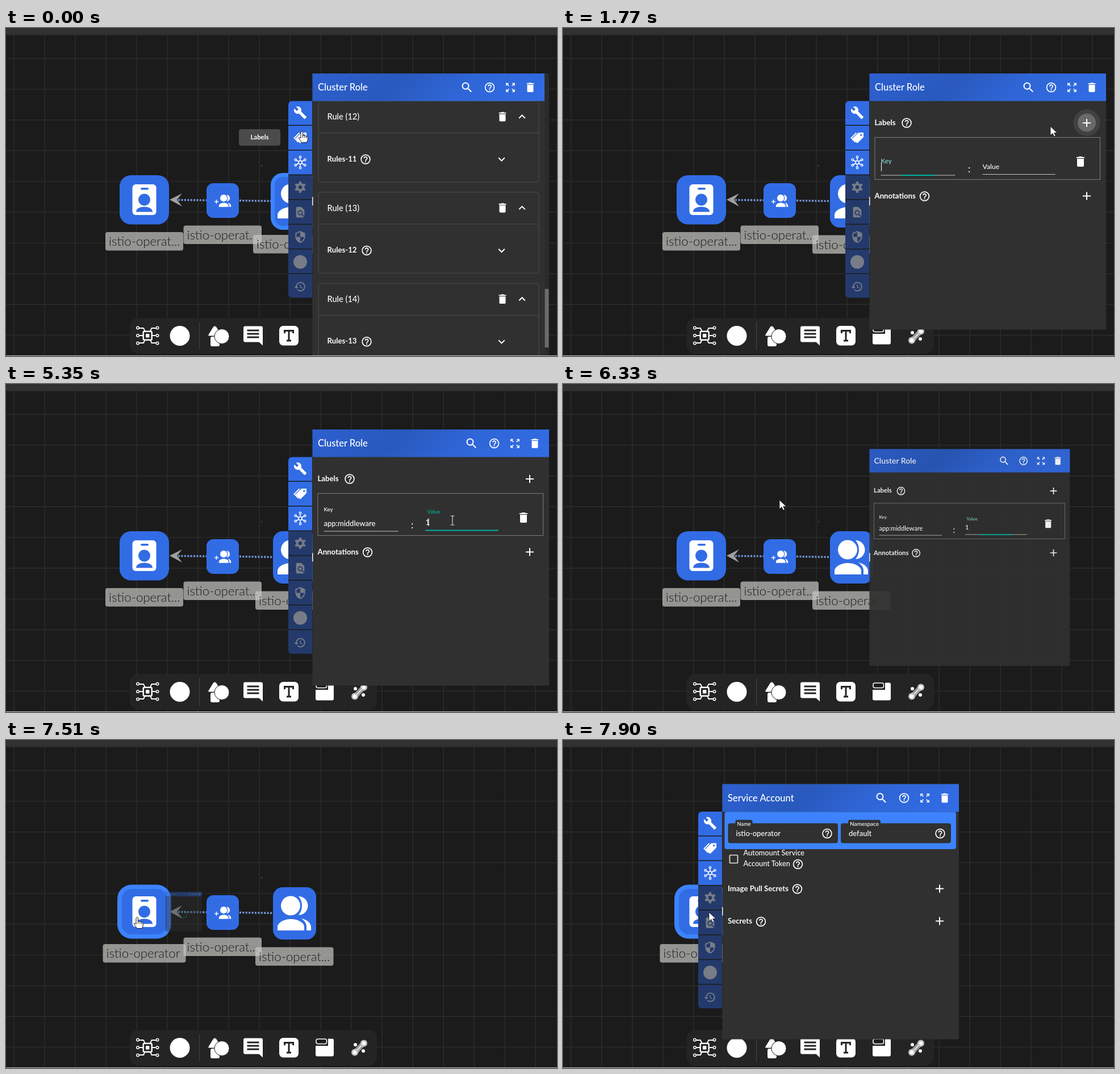
An HTML page that plays this animation: 970x577 px, repeating every 8 s.

```html
<!DOCTYPE html>
<html lang="en">
<head>
<meta charset="utf-8">
<title>Editing labels of a cluster role</title>
<style>
html, body { margin: 0; width: 100%; height: 100%; overflow: hidden; background: #1b1b1b; }
svg { display: block; width: 970px; height: 577px; font-family: Lato, "Open Sans", sans-serif; font-weight: 500; }
text { white-space: pre; }
</style>
</head>
<body>
<svg viewBox="0 0 970 577">
  <defs>
    <linearGradient id="head" gradientUnits="userSpaceOnUse" x1="0" y1="0" x2="230" y2="230">
      <stop offset="0" stop-color="#2d60d0"/>
      <stop offset=".36" stop-color="#2959bd"/>
      <stop offset=".62" stop-color="#2f65d6"/>
      <stop offset="1" stop-color="#326ce5"/>
    </linearGradient>
  </defs>
  <g id="scene"></g>
  <g id="live"></g>
  <rect y="576" width="970" height="1" fill="#cfc4c8"/>
</svg>
<script>
const BLUE = '#326ce5', BRIGHT = '#3d83ff', PANEL = '#303030', TEAL = '#00b39f';
const LOOP = 8000;

const ICONS = {
  search: 'M15.5 14h-.79l-.28-.27A6.47 6.47 0 0 0 16 9.5 6.5 6.5 0 1 0 9.5 16c1.61 0 3.09-.59 4.23-1.57l.27.28v.79l5 4.99L20.49 19zm-6 0a4.5 4.5 0 1 1 0-9 4.5 4.5 0 0 1 0 9z',
  help: 'M11 18h2v-2h-2zm1-16a10 10 0 1 0 0 20 10 10 0 0 0 0-20zm0 18a8 8 0 1 1 0-16 8 8 0 0 1 0 16zm0-14c-2.21 0-4 1.79-4 4h2c0-1.1.9-2 2-2s2 .9 2 2c0 2-3 1.75-3 5h2c0-2.25 3-2.5 3-5 0-2.21-1.79-4-4-4z',
  expand: 'M15 3l2.3 2.3-2.89 2.87 1.42 1.42L18.7 6.7 21 9V3zM3 9l2.3-2.3 2.87 2.89 1.42-1.42L6.7 5.3 9 3H3zm6 12l-2.3-2.3 2.89-2.87-1.42-1.42L5.3 17.3 3 15v6zm12-6l-2.3 2.3-2.87-2.89-1.42 1.42 2.89 2.87L15 21h6z',
  trash: 'M6 19c0 1.1.9 2 2 2h8c1.1 0 2-.9 2-2V7H6zM19 4h-3.5l-1-1h-5l-1 1H5v2h14z',
  down: 'M16.59 8.59 12 13.17 7.41 8.59 6 10l6 6 6-6z',
  up: 'M12 8l-6 6 1.41 1.41L12 10.83l4.59 4.58L18 14z',
  add: 'M19 13h-6v6h-2v-6H5v-2h6V5h2v6h6z',
  wrench: 'M22.7 19l-9.1-9.1c.9-2.3.4-5-1.5-6.9-2-2-5-2.4-7.4-1.3L9 6 6 9 1.6 4.7C.4 7.1.9 10.1 2.9 12.1c1.9 1.9 4.6 2.4 6.9 1.5l9.1 9.1c.4.4 1 .4 1.4 0l2.3-2.3c.5-.4.5-1.1.1-1.4z',
  page: 'M20 19.59V8l-6-6H6c-1.1 0-2 .9-2 2v16c0 1.1.9 2 2 2h12c.45 0 .85-.15 1.19-.4l-4.43-4.43A5 5 0 1 1 16.17 15.75zM9 13a3 3 0 1 0 6 0 3 3 0 0 0-6 0z',
  shield: 'M12 1 3 5v6c0 5.55 3.84 10.74 9 12 5.16-1.26 9-6.45 9-12V5zm0 11h7c-.53 4.12-3.28 7.79-7 8.94V12H5V6.3l7-3.11z',
  history: 'M13 3a9 9 0 0 0-9 9H1l3.96 4L9 12H6a7 7 0 1 1 2.06 4.94l-1.42 1.42A9 9 0 1 0 13 3zm-1 5v5l4.28 2.54.72-1.21-3.5-2.08V8z'
};

// ---- drawing helpers
const box = (x, y, w, h, r, fill, more = '') =>
  `<rect x="${x}" y="${y}" width="${w}" height="${h}" rx="${r}" fill="${fill}" ${more}/>`;
const path = (d, fill = '#fff', more = '') => `<path d="${d}" fill="${fill}" ${more}/>`;
const line = (d, color = '#fff', w = 1, more = '') => path(d, 'none', `stroke="${color}" stroke-width="${w}" ${more}`);
const dot = (x, y, r, fill = '#fff', more = '') => `<circle cx="${x}" cy="${y}" r="${r}" fill="${fill}" ${more}/>`;
const text = (x, y, size, str, more = 'fill="#fff"') =>
  `<text x="${x}" y="${y + size * .35}" font-size="${size}" ${more}>${str}</text>`;
const bold = (x, y, str) => text(x, y, 13.2, str, 'fill="#fff" font-weight="700"');
const group = (transform, body, more = '') => `<g transform="${transform}" ${more}>${body}</g>`;
const icon = (name, x, y, size = 24, fill = '#fff') =>
  group(`translate(${x} ${y}) scale(${size / 24}) translate(-12 -12)`, path(ICONS[name], fill, 'fill-rule="evenodd"'));
const help = (x, y) => icon('help', x, y, 21);
const around = (n, f) => Array.from({length: n}, (_, i) => f(i * 360 / n)).join('');

// ---- canvas, nodes and dock
function grid() {
  let d = '';
  for (let x = 14; x < 970; x += 54) d += `M${x} 12V577`;
  for (let y = 53.5; y < 577; y += 54.1) d += `M0 ${y}H970`;
  return line(d, '#2d2d2d', 1.4);
}

function dock() {
  const pins = line('M235 541h6M234 528h8l3 6M234 554h8l3-6', '#fff', 1.8) +
    [527.5, 541, 554.5].map(y => dot(232, y, 2.2, 'none', 'stroke="#fff" stroke-width="1.6"')).join('');
  return box(218, 510, 435, 63, 15, '#242424') + box(340, 517, 1.2, 49, 0, '#3c4049') +
    pins + group('translate(498.5 0) scale(-1 1)', pins) +
    box(241.7, 533.7, 15, 15, 2, 'none', 'stroke="#fff" stroke-width="2.4"') + box(246, 538, 6.4, 6.4, 1, '#fff') +
    dot(306, 541.5, 17.5) +
    path('M367.500 524.500q2 0 3 2l8 13q1 2-1 2h-20q-2 0-1-2l8-13q1-2 3-2z') + box(360, 543, 16, 17, 3, '#fff') +
    dot(380, 542.5, 13, '#fff', 'stroke="#242424" stroke-width="1"') +
    path('M421 524.5h28q3 0 3 3v31l-6.500-6H421q-3 0-3-3v-22q0-3 3-3z') +
    line('M424.500 532h21M424.500 538h21M424.500 544h21', '#242424', 2.8) +
    box(481, 524, 34, 34.500, 7, '#fff') +
    line('M490.500 537v-4.500h15v4.500M498 532.500v17.500M494 550h8', '#242424', 3) +
    path('M545 538h22v-12.500h7q3 0 3 3v25q0 3-3 3h-26q-3 0-3-3z') +
    box(546, 526, 18.500, 8.500, 3, '#1c1c1c', 'stroke="#fff" stroke-width="1.5"') +
    line('M614 550 630 533', '#9b9b9b', 9, 'stroke-linecap="round"') +
    line('M614 550 630 533', '#fff', 1.5) +
    dot(614, 549.500, 6, '#c4c4c4') + dot(630, 533.500, 6, '#c4c4c4') +
    dot(614, 549.500, 3.2) + dot(630, 533.500, 3.2) + dot(615, 536, 3) + dot(629, 547, 3);
}

const people = dot(501, 291.5, 17) +
  path('M478 335v-6c0-8 12-14 23.500-14s23.500 6 23.500 14v6z') +
  path('M515 275a16.500 16.500 0 0 1 0 33c8-9 8-24 0-33z') +
  path('M520 314c10 2 17 8 17 15v6h-8v-7c0-6-4-10-9-14z');

const label = (x, y, w, str) => box(x, y, w, 32.5, 4, '#c8c8c4', 'opacity=".7"') +
  text(x + 6, y + 16.5, 22.2, str, 'fill="#1b1b1b" font-weight="300"');

function nodes(account, role) {
  const name = on => on ? 'istio-operator' : 'istio-operat...';
  return line('M303 302.500 353 303M411 303.500 470 304.500', '#7197dc', 3.4, 'stroke-dasharray="3 2.400"') +
    path('M288 302 310 291 301 302 310 314z', '#a0a0a0') +
    (account ? box(196, 254.5, 94.5, 95, 25, BRIGHT) + box(204, 262, 79, 80, 17, BLUE) : box(200, 259, 87, 86.500, 20, BLUE)) +
    box(222.5, 275, 42, 54, 6, '#fff') + box(237, 281, 14, 3.6, 1.8, BLUE) + dot(243.5, 302, 10.5, BLUE) +
    path('M229 323.500c0-6 7-9 14.500-9s14.500 3 14.500 9z', BLUE) +
    box(353, 273, 57, 61, 12, BLUE) + line('M367 305.500h7M370.500 302v7', '#fff', 1.5) +
    group('translate(385.5 304) scale(.36) translate(-507.5 -305)', people) +
    (role ? box(466, 255, 84, 100, 21, BRIGHT) + box(473, 262, 70, 86, 14, BLUE) : box(470, 259, 76, 92, 17, BLUE)) +
    people +
    (account ? label(170.5, 359, 146, name(true)) : label(175, 359, 137, name())) +
    label(312.5, 347.5, 137.500, name()) +
    (role ? label(435, 364, 146, name(true)) : label(439, 364.5, 137.500, name()));
}

// ---- side tabs beside an open panel
function tabs(x, y) {
  const grey = '#777c86';
  const tag = path('M23 3h-9L4.500 12.500a1.500 1.500 0 0 0 0 2L11 21a1.500 1.500 0 0 0 2 0L23 11z') +
    dot(18.8, 7.2, 1.6, BLUE) + line('M10.500 3.500 1.500 12.500 8.500 20', '#fff', 1.8);
  const hub = dot(12, 12, 3, 'none', 'stroke="#fff" stroke-width="1.6"') + around(6, a => group(`rotate(${a} 12 12)`,
    line('M12 9V4', '#fff', 1.5) + dot(12, 2.5, 1.7, 'none', 'stroke="#fff" stroke-width="1.4"')));
  const gear = dot(12, 12, 5.3, 'none', `stroke="${grey}" stroke-width="4"`) + around(6, a =>
    group(`rotate(${a} 12 12)`, path('M9.600 6.500 10.200 2h3.600l.6 4.500z', grey)));
  const at = (i, body) => group(`translate(9 ${9 + i * 43.5})`, body);
  let out = box(0, 0, 42, 346, 7, '#1b1b1b');
  for (let i = 0; i < 8; i++) {
    const top = i * 43.5, fill = i < 3 ? BLUE : '#243a6c';
    out += i == 0 ? path('M7 0H42V42H0V7q0-7 7-7z', fill)
      : i == 7 ? path(`M0 ${top}H42V346H7q-7 0-7-7z`, fill) : box(0, top, 42, 42, 0, fill);
  }
  out += icon('wrench', 21, 20.5) + at(1, tag) + at(2, hub) + at(3, gear) + icon('page', 21, 195.500, 22, grey) +
    icon('shield', 21, 239, 23, grey) + dot(21, 283, 12, grey) + icon('history', 20.500, 326.500, 22, grey);
  return group(`translate(${x} ${y})`, out);
}

// ---- panels, in their own coordinates
function header(title, w, h) {
  const s = w - 416.5;
  return box(0, 0, w, h, 0, 'url(#head)') +
    text(9.500, h / 2, 16.5, title) + icon('search', 280 + s, 24.500) + help(320 + s, 24.500) +
    icon('expand', 356.5 + s, 24.500, 21) + icon('trash', 391.5 + s, 24.500, 22);
}

function rulesPanel() {
  let out = box(0, 0, 416.5, 497, 0, '#2b2b2b') + box(0, 0, 408.5, 497, 0, PANEL);
  for (let i = 0; i < 3; i++) {
    const y = 48 + i * 160.4;
    out += box(10.500, y + .5, 388, 142.500, 4, 'none', 'stroke="#4c4c4c"') + line(`M10 ${y + 56.500}H398`, '#4c4c4c') +
      text(26, y + 28, 14.6, `Rule (${12 + i})`) + icon('trash', 334.5, y + 28, 22) + icon('up', 369, y + 28) +
      bold(26, y + 102, `Rules-${11 + i}`) + help([93.5, 95.5, 95.5][i], y + 103) + icon('down', 333, y + 103);
  }
  return out + header('Cluster Role', 408.5, 48.5) + box(409, 379, 7, 103, 0, '#6b6b6b');
}

const mix = p => `rgb(${[0, 179, 159].map(c => Math.round(255 + (c - 255) * p))})`;
const lerp = (a, b, p) => a + (b - a) * p;
const ramp = (t, a, b) => Math.min(1, Math.max(0, (t - a) / (b - a)));

function field(x, w, y, name, float, focus, from, to) {
  const mid = x + w / 2, half = focus * w / 2;
  return text(lerp(from[0], to[0], float), lerp(from[1], to[1], float), lerp(from[2], to[2], float), name, `fill="${mix(focus)}"`) +
    line(`M${x} ${y}h${w}`, '#c6c6c6') + (focus ? line(`M${mid - half} ${y}H${mid + half}`, TEAL, 2) : '');
}

function labelsPanel(t) {
  const row = t > 1620, shift = row ? 0 : -83;
  const typed = t > 2300, one = t > 4800;
  let out = box(0, 0, 416.5, 450.5, 0, PANEL) + header('Cluster Role', 416.5, 48.5);
  const hover = t > 1210 ? 1 - ramp(t, 1770, 2100) : 0;
  if (hover) out += dot(382.5, 86.5, 23.5, '#414141', `opacity="${hover}"`);
  if (t > 1490 && hover) out += dot(382.5, 86.5, 16, '#6a6a6a', `opacity="${hover}"`);
  out += bold(9, 86, 'Labels') + help(65.5, 87) + icon('add', 382.5, 87) +
    bold(9, 215.500 + shift, 'Annotations') + help(97, 216 + shift) + icon('add', 382.5, 215.500 + shift);
  if (!row) return out;
  const keyFocus = ramp(t, 1600, 1970) * (1 - ramp(t, 3960, 4200));
  const valFloat = ramp(t, 3950, 4260), valFocus = valFloat * (1 - ramp(t, 6130, 6560));
  out += box(9.500, 112.500, 396.500, 74, 0, 'none', 'stroke="#7b7b7b"') +
    field(20, 131, 179, 'Key', ramp(t, 1600, 1970), keyFocus, [20, 165, 13], [20, 141, 9.7]) +
    field(199, 128, 177.500, 'Value', valFloat, valFocus, [199, 163.500, 12.2], [202, 145, 9.4]) +
    text(173.5, 168, 17, ':') + icon('trash', 371.5, 155, 24);
  if (typed) out += text(20, 165.500, 13, 'app:middleware');
  if (one) out += text(199, 163, 13, '1');
  if (t < 3980) out += box(typed ? 111.5 : 20.5, 157, 1, 15, 0, '#fff');
  else if (t < 6190) out += box(one ? 204 : 199.5, 156, 1, 14, 0, '#fff');
  return out;
}

function accountPanel(t) {
  let out = box(0, 0, 416.5, 449, 0, PANEL) + header('Service Account', 416.5, 49);
  if (t < 7890) return out + line('M208 222a36 36 0 1 1-36 36', TEAL, 7);
  const input = (x, w, name, tagW, value, size) =>
    box(x, 69, w, 35, 4, PANEL) + box(x + 13, 63, tagW, 13, 3, PANEL) +
    text(x + 16, 70, size, name) + text(x + 14, 87, 13, value) + help(x + w - 19, 87);
  return out + box(4, 49, 407.5, 65.5, 4, BRIGHT) +
    input(10, 193.5, 'Name', 30, 'istio-operator', 9.3) + input(208.5, 194, 'Namespace', 57, 'default', 10) +
    box(13, 125, 14, 14, 1, 'none', 'stroke="#e4e4e4" stroke-width="1.700"') +
    text(37, 121, 12.7, 'Automount Service') + text(37, 140, 12.7, 'Account Token') + help(133, 141) +
    bold(9.500, 184, 'Image Pull Secrets') + help(132, 184.500) + icon('add', 382.5, 184) +
    bold(9.500, 241, 'Secrets') + help(68, 242) + icon('add', 382.5, 241);
}

const place = (x, y, h, [scale, alpha], body) =>
  group(`translate(${x} ${y + h / 2}) scale(${scale}) translate(0 ${-h / 2})`, body, `opacity="${alpha}"`) +
  (scale > .8 ? box(x - .5, y + h / 2 - 8, 1.5, 15, 0, '#f2f2f2') : '');

// ---- timing: [time, value...]
const CLOSE = [[0, 1, 1], [6195, .985, 1], [6325, .847, .92], [6455, .3, .4], [6585, 0, 0]];
const OPEN = [[0, 0, 0], [7385, .04, .2], [7505, .154, .42], [7635, .8, .9], [7765, 1.12, 1], [7895, 1, 1]];
const POINTER = [
  [0, 521, 182, 'hand'], [390, 521, 182, 'hand'], [1070, 921, 162, 'hand'], [1495, 921, 162, 'arrow'],
  [1770, 858, 173, 'arrow'], [2180, 646, 240, 'beam'], [2300, 646, 240, ''], [2900, 655, 205, 'arrow'],
  [3180, 725, 236, 'beam'], [3320, 745, 244, 'beam'], [3580, 786, 240, 'beam'], [5350, 786, 240, 'beam'],
  [5490, 740, 268, 'arrow'], [5780, 590, 304, 'arrow'], [6060, 381, 204, 'arrow'], [6590, 381, 204, 'arrow'],
  [7130, 231, 312, 'hand'], [7640, 231, 312, 'hand'], [7900, 257, 303, 'arrow'], [LOOP, 257, 303, 'arrow']
];
// The screen refreshes about every 135 ms between these moments.
const BEATS = [0, 130, 1070, 1220, 1770, 2180, 2310, 2900, 3320, 3580, 3990, 4950, 5090, 5350, 6060, 6200, 6330, 7130, 7270, 7510, 7900, LOOP];

function held(t) {
  const i = BEATS.findIndex(b => b > t), a = BEATS[i - 1], len = BEATS[i] - a;
  const step = len / Math.max(1, Math.round(len / 135));
  return a + Math.floor((t - a) / step) * step;
}

const last = (table, t) => table.filter(k => k[0] <= t).pop().slice(1);

const SHAPES = {
  hand: path('M-2 1.500C-2-.5 1.500-.5 1.500 1.500V7.500C2 6.500 4.500 6.500 4.800 8 5.500 7.200 7.500 7.500 7.800 9 8.800 8.300 10.300 9 10.300 10.500V14C10.300 17 8.500 17 8.500 19.500H-.5C-1 17.500-5 14-5.500 12-6 10-4 9.800-2 12Z', '#fff', 'stroke="#111"') +
    line('M1.500 7v4M4.800 8v3.500M7.800 9v3', '#111', .9),
  arrow: path('M0 0V16l4-3.600 2.600 5.600 2.600-1.100L6.700 11.500H12z', '#fff', 'stroke="#111" stroke-width=".8"'),
  beam: line('M-3.500-8H-1L0-7 1-8H3.500M0-7V7M-3.500 8H-1L0 7 1 8H3.500', '#d8d8d8', 1.2)
};

function pointer(t) {
  const i = POINTER.findIndex(k => k[0] > t), a = POINTER[i - 1], b = POINTER[i];
  if (!a[3]) return '';
  const p = ramp(t, a[0], b[0]);
  return group(`translate(${lerp(a[1], b[1], p)} ${lerp(a[2], b[2], p)})`, SHAPES[a[3]]);
}

function picture(t) {
  const rules = t < 390, close = last(CLOSE, t), open = last(OPEN, t);
  let out = nodes(t > 7260, rules) + dock();
  if (close[0]) {
    if (t < 6190) out += tabs(497, 128.5);
    out += place(539.5, 80, 450.5, close, rules ? rulesPanel() : labelsPanel(t));
  }
  if (open[0]) {
    if (t > 7890) out += tabs(238, 126);
    out += place(280.5, 77.5, 449, open, accountPanel(t));
  }
  if (rules) out += box(410, 178, 73, 29, 4, '#4b4b4b') +
    text(446.5, 192.5, 11.4, 'Labels', 'fill="#fff" font-weight="700" text-anchor="middle"');
  return out + pointer(t);
}

const live = document.getElementById('live');
document.getElementById('scene').innerHTML = box(0, 0, 970, 577, 0, '#1b1b1b') + grid() +
  dot(450, 242, 1.8, '#333') + box(0, 0, 970, 12.5, 0, '#313131');

const start = performance.now();
let shown = -1;
function tick() {
  const t = held(Math.max(0, performance.now() - start) % LOOP);
  if (t !== shown) live.innerHTML = picture(shown = t);
  requestAnimationFrame(tick);
}
tick();
</script>
</body>
</html>
```
